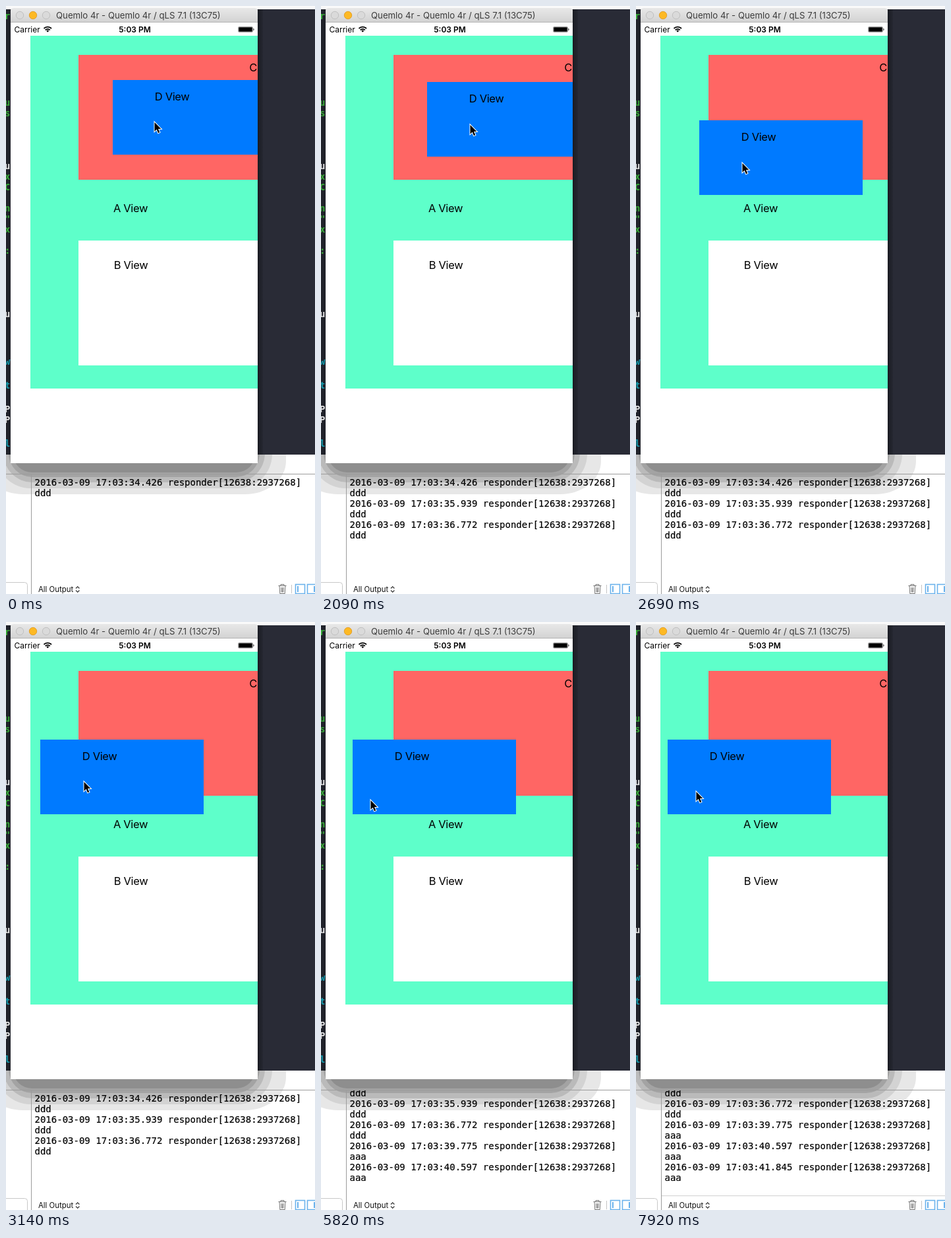
An HTML page for the animation above (8000 ms loop, 469 by 890 pixels).

```html
<!DOCTYPE html>
<html lang="en">
<head>
<meta charset="utf-8">
<title>Responder demo</title>
<style>
  html, body { margin: 0; width: 100%; height: 100%; overflow: hidden; background: #fff; }
  svg { position: absolute; left: 0; top: 0; display: block; }
  text { font-family: Inter, sans-serif; white-space: pre; }
  .label text { font-size: 16.5px; letter-spacing: -.35px; }
  .code text, pre { font-family: "DejaVu Sans Mono", monospace; font-size: 14px; }
  .code text { font-weight: bold; }

  .console { position: absolute; left: 39px; top: 709px; width: 430px; height: 159px; overflow: hidden; }
  pre {
    position: absolute; left: 4.5px; top: 4px; margin: 0; overflow: hidden;
    line-height: 16px; color: #000; -webkit-text-stroke: .2px #000;
  }

  /* every change is a hard step on one shared 8 s clock */
  pre, .view-d, .cursor, .rule { animation: 8s step-end -2ms infinite; }
  pre { animation-name: log; }
  .view-d { animation-name: drag; }
  .cursor { animation-name: point; }
  .rule { animation-name: rule; }

  @keyframes log {
    0% { height: 32px; transform: none; }
    15% { height: 64px; transform: none; }
    24.25% { height: 96px; transform: none; }
    61.5% { height: 128px; transform: none; }
    72.75% { height: 160px; transform: translateY(-24px); }
    87.75%, 100% { height: 192px; transform: translateY(-56px); }
  }
  @keyframes rule {
    0% { opacity: 0; }
    74.625%, 100% { opacity: 1; }
  }
  @keyframes drag {
    0% { transform: translate(162px, 112px); }
    26.125% { transform: translate(161px, 115px); }
    28% { transform: translate(149px, 130px); }
    29.875% { transform: translate(131px, 148px); }
    31.75% { transform: translate(115px, 163px); }
    33.625% { transform: translate(96px, 173px); }
    35.5% { transform: translate(80px, 175px); }
    37.375% { transform: translate(65px, 176px); }
    39.25% { transform: translate(52px, 178px); }
    41% { transform: translate(50px, 178px); }
    42.875%, 100% { transform: translate(48px, 178px); }
  }
  @keyframes point {
    0% { transform: translate(225px, 175px); }
    18.625% { transform: translate(224px, 176px); }
    20.5% { transform: translate(224px, 175px); }
    22.375% { transform: translate(228px, 177px); }
    26.125% { transform: translate(226px, 179px); }
    28% { transform: translate(214px, 194px); }
    29.875% { transform: translate(196px, 212px); }
    31.75% { transform: translate(180px, 227px); }
    33.625% { transform: translate(161px, 237px); }
    35.5% { transform: translate(145px, 239px); }
    37.375% { transform: translate(130px, 240px); }
    39.25% { transform: translate(118px, 241px); }
    41% { transform: translate(116px, 241px); }
    42.875% { transform: translate(115px, 241px); }
    54% { transform: translate(77px, 268px); }
    55.875% { transform: translate(75px, 269px); }
    95.25% { transform: translate(75px, 268px); }
    99%, 100% { transform: translate(91px, 256px); }
  }
</style>
</head>
<body>
<svg width="469" height="890" viewBox="0 0 469 890">
  <defs>
    <linearGradient id="bar" x2="0" y2="1">
      <stop stop-color="#e8e8e8"/><stop offset="1" stop-color="#d2d2d2"/>
    </linearGradient>
    <linearGradient id="shade">
      <stop stop-color="#1a1c23"/><stop offset="1" stop-color="#252731"/>
    </linearGradient>
    <clipPath id="below"><rect y="679" width="469" height="211"/></clipPath>
    <clipPath id="screen"><rect x="7" y="25" width="375" height="667"/></clipPath>
  </defs>

  <!-- editor behind the window -->
  <rect width="469" height="890" fill="#fff"/>
  <rect width="469" height="5" fill="#fafafa"/>
  <rect y="5" width="469" height="674" fill="#292b36"/>
  <rect y="5" width="7" height="674" fill="#20222a"/>
  <rect x="382" y="5" width="8" height="674" fill="url(#shade)"/>
  <g class="code" fill="#38a838">
    <text x="-2" y="20">r</text>
    <text x="-2" y="151">u</text><text x="-2" y="167">s</text>
    <text x="-2" y="263">x</text><text x="-2" y="279">C</text>
    <text x="-2" y="311">n</text><text x="-2" y="327">"</text><text x="-2" y="343">x</text>
    <text x="-2" y="375">:</text>
    <g fill="#e4e4e4">
      <text x="-2" y="247">u</text><text x="-2" y="471">u</text>
      <text x="-2" y="615">P</text><text x="-2" y="631">P</text>
    </g>
    <g fill="#149cae">
      <text x="-2" y="543">w</text><text x="-2" y="579">t</text><text x="-2" y="667">l</text>
    </g>
  </g>

  <!-- banded window shadow -->
  <g clip-path="url(#below)">
    <rect x="-36" y="560" width="461" height="179" rx="62" ry="50" fill="#e7e7e7"/>
    <rect x="-15" y="560" width="419" height="170" rx="52" fill="#d3d3d3"/>
    <rect x="-4" y="560" width="397" height="161" rx="44" fill="#bababa"/>
    <rect x="4" y="560" width="381" height="153" rx="36" fill="#a3a3a3"/>
    <rect x="11" y="560" width="367" height="146" rx="28" fill="#8e8e8e"/>
  </g>

  <!-- debug area -->
  <path d="M0 708.5H469M38.5 709V890" stroke="#9c9c9c"/>
  <rect class="rule" x="39" y="868" width="430" height="1" fill="#d0d0d0"/>
  <rect x="-10" y="872.5" width="42.5" height="24" rx="4" fill="#fff" stroke="#c8c8c8"/>
  <text x="49" y="886.5" font-size="11.4" fill="#111">All Output</text>
  <path d="M106 881.5l2.7-2.7 2.7 2.7M106 884.5l2.7 2.7 2.7-2.7" fill="none" stroke="#333" stroke-width="1.2"/>
  <path d="M413.5 877.5h12M417 877v-1.5h5v1.500M415 878l.8 11.500h7.400l.8-11.500M417.700 880l.3 7.500M419.500 880v7.500M421.300 880l-.3 7.500" fill="none" stroke="#747474"/>
  <path d="M433.5 876v13" stroke="#c4c4c4"/>
  <g fill="none" stroke="#6bb2ec" stroke-width="1.6">
    <rect x="439.5" y="875.5" width="14" height="14"/>
    <rect x="457.5" y="875.5" width="14" height="14"/>
    <path d="M443 878v9M468 878v9" stroke-width="2"/>
  </g>

  <!-- simulator window -->
  <path d="M7 692V8q0-5 5-5H377q5 0 5 5V692z" fill="#fff"/>
  <path d="M7 25V8q0-5 5-5H377q5 0 5 5V25z" fill="url(#bar)"/>
  <path d="M7 24.5H382" stroke="#b4b4b4"/>
  <g fill="#dadada" stroke="#c0c0c0">
    <circle cx="21" cy="14" r="5.7"/>
    <circle cx="41" cy="14" r="5.7" fill="#fdb924" stroke="#e3a02c"/>
    <circle cx="61" cy="14" r="5.7"/>
  </g>
  <text x="76" y="19" font-size="13.2" fill="#3c3c3c">Quemlo 4r - Quemlo 4r / qLS 7.1 (13C75)</text>

  <text x="12.5" y="39.5" font-size="12">Carrier</text>
  <g fill="none" stroke="#000" stroke-width="1.8">
    <path d="M57.5 34a8 8 0 0 1 11.5 0M59.7 36.3a5 5 0 0 1 7.1 0"/>
    <path d="M61.3 37.6L63.25 39.8 65.2 37.6a2.7 2.7 0 0 0-3.9 0z" fill="#000" stroke="none"/>
  </g>
  <text x="195.5" y="39.5" font-size="12" font-weight="600" text-anchor="middle">5:03 PM</text>
  <rect x="352.5" y="31.5" width="22" height="8" rx="1.5" fill="#fff" stroke="#888" stroke-width=".8"/>
  <rect x="353.3" y="32.3" width="20.4" height="6.4" rx=".5"/>
  <path d="M375.5 33.500q2 2 0 4z"/>

  <g class="label" clip-path="url(#screen)">
    <rect x="37" y="45" width="345" height="534" fill="#5effca"/>
    <rect x="110" y="74" width="272" height="189" fill="#ff6664"/>
    <rect x="110" y="355" width="272" height="189" fill="#fff"/>
    <text x="163" y="312">A View</text>
    <text x="163.8" y="398">B View</text>
    <text x="369.3" y="99">C View</text>
    <g class="view-d">
      <rect width="248" height="113" fill="#007aff"/>
      <text x="63.8" y="31">D View</text>
    </g>
  </g>

  <path class="cursor" d="M.5 1V14.700L3.700 11.800 6 17.200 8.300 16.200 6 11H10.300z" stroke="#fff" stroke-width="2" paint-order="stroke"/>
</svg>

<div class="console"><pre>2016-03-09 17:03:34.426 responder[12638:2937268]
ddd
2016-03-09 17:03:35.939 responder[12638:2937268]
ddd
2016-03-09 17:03:36.772 responder[12638:2937268]
ddd
2016-03-09 17:03:39.775 responder[12638:2937268]
aaa
2016-03-09 17:03:40.597 responder[12638:2937268]
aaa
2016-03-09 17:03:41.845 responder[12638:2937268]
aaa</pre></div>
</body>
</html>
```
